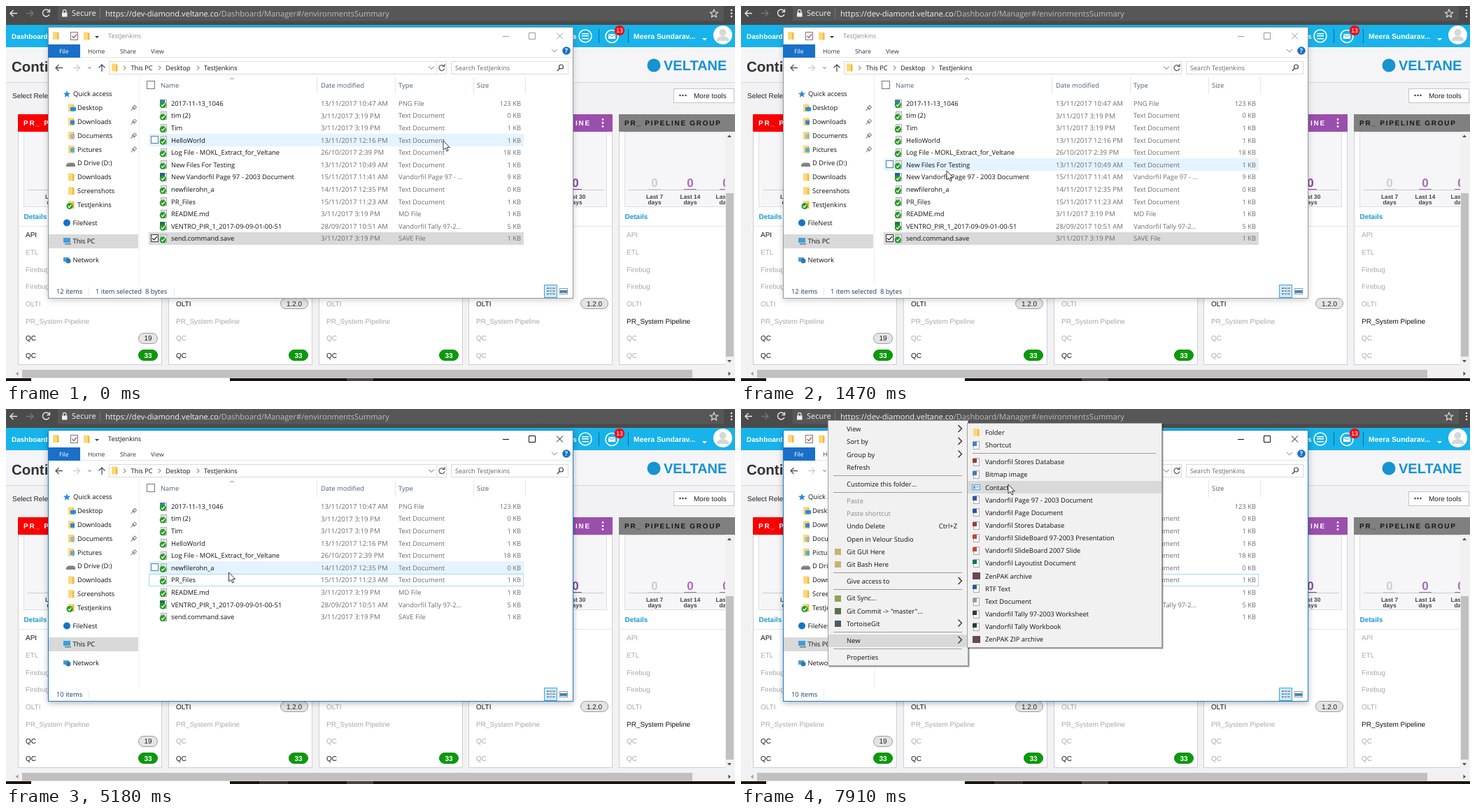
These frames come from a looping animation (1042x537 px, 8000 ms). An HTML page:

```html
<!DOCTYPE html>
<html lang="en">
<head>
<meta charset="utf-8">
<title>File manager demo</title>
<style>
html, body { margin: 0; width: 100%; height: 100%; overflow: hidden; background: #f2f2f4; }
svg { display: block; width: 1042px; height: 537px; }
text { text-rendering: geometricPrecision; white-space: pre; }
.ui { font-family: "Open Sans", "Noto Sans", sans-serif; }
.web { font-family: "Liberation Sans", Arial, sans-serif; }
</style>
</head>
<body>
<svg viewBox="0 0 1042 537" xmlns="http://www.w3.org/2000/svg">
  <defs><filter id="soft" x="-10%" y="-10%" width="120%" height="120%"><feGaussianBlur stdDeviation="4"/></filter></defs>
  <g id="page"></g>
  <g id="frame"></g>
  <g id="list"></g>
  <g id="menu"></g>
  <g id="sub"></g>
  <path id="cursor" d="M0 0V13L3 10.3 5.1 15 7.1 14.1 5.1 9.6H9.3Z" fill="#fff" stroke="#222" stroke-width=".9"/>
</svg>
<script>
const STEP = 70, LOOP = 8000, LAST = 7910;
const el = id => document.getElementById(id);

// y is the middle of the capitals
const text = (x, y, s, o = {}) => {
  const size = o.size || 9.4;
  return `<text class="${o.web ? 'web' : 'ui'}" x="${x}" y="${(y + size * .36).toFixed(2)}" font-size="${size}"` +
    ` fill="${o.fill || '#111'}" text-anchor="${o.anchor || 'start'}" font-weight="${o.bold ? 700 : 400}"` +
    ` letter-spacing="${o.gap || 0}">${s}</text>`;
};
const web = (x, y, s, o = {}) => text(x, y, s, { size: 10, web: true, ...o });
const rect = (x, y, w, h, fill, extra = '') =>
  `<rect x="${x}" y="${y}" width="${w}" height="${h}" fill="${fill}" ${extra}/>`;
const box = (x, y, w, h, fill, stroke, extra = '') =>
  rect(x + .5, y + .5, w - 1, h - 1, fill, `stroke="${stroke}" ${extra}`);
const path = (d, stroke, width = 1, fill = 'none') =>
  `<path d="${d}" fill="${fill}" stroke="${stroke}" stroke-width="${width}"/>`;
const disc = (x, y, r, fill, extra = '') => `<circle cx="${x}" cy="${y}" r="${r}" fill="${fill}" ${extra}/>`;
const tri = (x, y, w, h, fill) => path(`M${x - w} ${y}h${2 * w}l${-w} ${h}Z`, 'none', 0, fill);

const folder = (x, y) => rect(x - 4, y - 5.5, 8, 11, '#fbd877') + rect(x + 2, y - 4, 2.5, 9.5, '#eeb944');
const chevron = (x, y, c = '#444') => path(`M${x - 1.5} ${y - 3}l3 3-3 3`, c);
const down = (x, y, c = '#666') => path(`M${x - 4} ${y - 2}l4 4 4-4`, c);
const greenTick = (x, y) => disc(x, y, 4.6, '#259b24') + path(`M${x - 2.3} ${y}l1.8 1.9 3-4`, '#fff', 1.3);

function drawPage() {
  let s = rect(0, 0, 1042, 537, '#f2f2f4') + rect(0, 0, 1042, 27, '#4b4b4b') + rect(74, 0, 952, 21.5, '#575757');
  // browser bar
  s += path('M16 10.5H6M10.5 6L6 10.5 10.5 15', '#e8e8e8', 1.4) + path('M29 10.5h10M34.5 6L39 10.5 34.5 15', '#777', 1.4);
  s += path('M61.5 7A5 5 0 1 0 62 12M62.5 4.5v4h-4', '#e8e8e8', 1.4);
  s += rect(80, 9.5, 7.5, 6, '#eee') + path('M81.5 10V7.5a2.2 2.2 0 0 1 4.4 0V10', '#eee', 1.2);
  s += text(94, 10.5, 'Secure', { size: 11, fill: '#f4f4f4' }) + rect(134, 3, 1, 15, '#777');
  s += text(142, 10.5, 'https://dev-diamond.veltane.co<tspan fill="#bcbcbc">/Dashboard/Manager#/environmentsSummary</tspan>',
    { size: 11.1, fill: '#f4f4f4' });
  s += path('M1012 5l1.6 3.7 4 .4-3 2.7.9 4-3.5-2.1-3.5 2.1.9-4-3-2.7 4-.4Z', '#e0e0e0', 1.1);
  for (const y of [6, 10.5, 15]) s += disc(1037, y, 1.3, '#e8e8e8');
  // site header
  s += rect(0, 27, 1042, 32, '#17b3ea') + web(8, 43, 'Dashboard', { size: 9.9, bold: true, fill: '#fff' });
  s += web(810, 43, 's', { bold: true, fill: '#fff' });
  s += disc(828, 43, 9, 'none', 'stroke="#fff" stroke-width="1.6"');
  for (const y of [39, 42, 46]) s += rect(823, y, 10, 1.5, '#fff');
  s += rect(847, 33, 1, 20, '#0b6f95') + rect(889, 33, 1, 20, '#0b6f95');
  s += disc(866, 43.5, 9, 'none', 'stroke="#fff" stroke-width="1.6"') + rect(861, 40, 10, 7, '#fff') + path('M861 40.5l5 3.5 5-3.5', '#17b3ea');
  s += disc(877, 35, 7.3, '#e8121c') + web(877, 35, '13', { size: 8.6, fill: '#fff', anchor: 'middle' });
  s += web(897, 43, 'Meera Sundarav...', { size: 10.4, bold: true, fill: '#fff' }) + tri(998.5, 46, 3.5, 3.5, '#fff');
  s += disc(1024.5, 41.5, 13.5, '#fff') + disc(1024.5, 38, 5, '#d5d8da') + path('M1015.5 50a9 7 0 0 1 18 0Z', 'none', 0, '#d5d8da');
  // title rows
  s += rect(0, 59, 1042, 50, '#f5f5f7') + rect(0, 109, 1042, 1, '#d6d6d6') + web(8, 86.5, 'Conti', { size: 20.5, bold: true, fill: '#333' });
  s += disc(926, 85, 9.5, '#1693d1') + web(940, 85, 'VELTANE', { size: 20, bold: true, fill: '#1693d1' });
  s += web(9, 128, 'Select Rele', { fill: '#222' });
  s += box(954, 118, 87, 21, '#fff', '#c4c4c4') + web(983, 128, 'More tools', { fill: '#222' });
  for (const x of [963.5, 967.5, 971.5]) s += disc(x, 128, 1.2, '#333');
  // cards; "on" lists the rows in black
  const rows = ['API', 'ETL', 'Firebug', 'Firebug', 'OLTI', 'PR_System Pipeline', 'QC', 'QC'];
  const cards = [
    { head: '#fa0000', ink: '#fff', title: 'PR_ PIPELINE', on: [0, 6, 7], pills: { 6: '19', 7: '33' } },
    { head: '#9b4fad', ink: '#fff', title: '', on: [4, 7], pills: { 4: '1.2.0', 7: '33' } },
    { head: '#9b4fad', ink: '#fff', title: '', on: [7], pills: { 7: '33' } },
    { head: '#9b4fad', ink: '#fff', title: '', on: [4], pills: { 4: '1.2.0' } },
    { head: '#808080', ink: '#161616', title: 'PR_ PIPELINE GROUP', on: [5], pills: {} }
  ];
  cards.forEach((c, i) => {
    const x = Math.round(17 + 214.75 * i);
    s += box(x, 155, 206, 359, '#fff', '#cfcfcf') + rect(x, 155, 206, 25, c.head);
    s += web(x + 8, 167.5, c.title, { bold: true, fill: c.ink, gap: 1.75 });
    s += box(x + 8, 180, 190, 108, '#f6f6f9', '#dedee2');
    if (i === 3) {
      s += web(836, 167.5, 'INE', { anchor: 'end', bold: true, fill: '#fff', gap: 1.75 });
      for (const y of [162.5, 167.5, 172.5]) s += disc(853, y, 1.4, '#fff');
    }
    ['7', '14', '30'].forEach((n, k) => {
      const cx = x + 51 + 51 * k;
      const ink = i === 3 ? '#8c45a0' : k ? '#a66bb9' : '#d0cbd6';
      s += web(cx, 253, '0', { size: 17, bold: true, fill: ink, anchor: 'middle' }) + rect(cx - 9, 262, 18, 2, ink);
      s += web(cx, 273, 'Last ' + n, { size: 8.4, bold: true, fill: '#444', anchor: 'middle' });
      s += web(cx, 281, 'days', { size: 8.4, bold: true, fill: '#444', anchor: 'middle' });
    });
    s += rect(x + 14, 263, 180, 1, '#ccc');
    s += web(x + 8.5, 301.5, 'Details', { bold: true, fill: '#1b9ad0' }) + rect(x + 1, 315, 204, 1, '#e6e6e6');
    rows.forEach((name, r) => {
      const y = 327.5 + 24.7 * r;
      s += web(x + 11, y, name, { fill: c.on.includes(r) ? '#111' : '#a9a9a9' });
      const label = c.pills[r];
      if (!label) return;
      const w = label.length > 2 ? 40 : 28, green = label === '33', px = x + 200 - w;
      s += box(px, Math.round(y - 8), w, 16, green ? '#0b9a0b' : '#e4e4e4', green ? '#0b8a0b' : '#9d9d9d', 'rx="7.5"');
      s += web(px + w / 2, y, label, { anchor: 'middle', bold: green, fill: green ? '#fff' : '#222' });
    });
  });
  s += rect(1028, 180, 14, 334, '#f1f1f1') + rect(1029, 268, 11, 234, '#c0c0c0');
  s += tri(1034, 188, 3, -3.5, '#505050') + tri(1034, 507, 3, 3.5, '#505050');
  // bottom scroll bar and desktop strip
  s += rect(9, 520, 1033, 13, '#f1f1f1') + rect(23, 521, 958, 11.5, '#c0c0c0');
  s += path('M17.5 523.5v6l-3.5-3Z', 'none', 0, '#999') + path('M1032.5 523.5v6l3.5-3Z', 'none', 0, '#505050');
  s += rect(0, 533, 1042, 4, '#1c140d') + rect(36, 533, 284, 4, '#fff') + rect(487, 533, 38, 4, '#4b4340');
  el('page').innerHTML = s;
}

function navPane() {
  let s = '';
  const places = ['Desktop', 'Downloads', 'Documents', 'Pictures', 'D Drive (D:)', 'Downloads', 'Screenshots', 'TestJenkins'];
  s += rect(61, 327, 128, 20, '#d9d9d9') + rect(190, 100, 1, 300, '#efefef');
  s += path('M87 121l1.4 3.4 3.8.3-2.9 2.4 1 3.7-3.3-2-3.3 2 1-3.7-2.9-2.4 3.8-.3Z', 'none', 0, '#2a8dd8') + text(96, 126, 'Quick access');
  places.forEach((name, i) => {
    const y = 145.9 + 19.8 * i;
    if (i === 4) s += path(`M86 ${y + 2}l3-2.5h8l2 2.5v3H86Z`, 'none', 0, '#7d8387');
    else s += folder(93, y);
    if (i < 4) {
      s += i ? rect(92, y - 2, 6, 6, ['#2f86d2', '#9fb6c8', '#57a9dd'][i - 1]) : rect(92, y - 1, 8, 5.5, '#1f8fe0');
      s += path(`M178.5 ${y + 4}l3-3M180 ${y - 1}l4 4M181.5 ${y - 1}l2.5-2.5 2.5 2.5-2.5 2.5Z`, '#8b8b8b', 1.1);
    }
    if (i === 7) s += greenTick(91, y + 2);
    s += text(102, y, name);
  });
  s += disc(87, 310.5, 5, '#1473c8') + text(95.5, 310.5, 'FileNest');
  s += rect(82, 332, 10, 7, '#3d9fdc') + rect(84, 340, 9, 1.5, '#6b7a86') + text(95.5, 337, 'This PC');
  s += rect(82, 360, 8, 6, '#4e9fd0') + disc(89, 365, 3.5, '#2f77b5') + text(95.5, 363.5, 'Network');
  return s;
}

function drawFrame(active) {
  const ink = active ? '#111' : '#999', edge = active ? '#1a7fd0' : '#8e9aa3';
  let s = `<g filter="url(#soft)">${rect(60, 33, 751, 388, '#000', `opacity="${active ? .3 : .2}"`)}</g>`;
  s += box(60, 30, 751, 389, '#fff', edge);
  s += folder(71, 42.5) + box(92, 37, 11, 12, '#fff', '#777') + path('M94.5 43l2.5 2.5 4-5', '#c05050', 1.3) + folder(115, 43);
  s += tri(130, 43, 3, 3, '#333') + text(146, 43, 'TestJenkins', { size: 9.1, fill: active ? '#111' : '#8d8d8d' });
  s += path('M710 43.5h9M747.5 38.5h9v9h-9ZM787 38.5l9 9M796 38.5l-9 9', ink);
  s += rect(60, 55, 46, 19, '#1a70c8') + text(76, 64.5, 'File', { size: 8.6, fill: '#fff' });
  [[117, 'Home'], [163, 'Share'], [207, 'View']].forEach(([x, n]) => s += text(x, 64.5, n, { size: 8.6, fill: '#333' }));
  s += down(784, 64, '#888') + disc(801, 64, 5.8, '#1a70c8') + text(801, 64, '?', { size: 9, bold: true, fill: '#fff', anchor: 'middle' });
  s += rect(106, 73, 704, 1, '#e4e4e4');
  // address row
  s += path('M81 88.5H71M75.5 84L71 88.5 75.5 93', '#555', 1.3) + path('M96 88.5h9M101 84l4.5 4.5-4.5 4.5', '#cfcfcf', 1.3);
  s += path('M117.5 87.5l2 2 2-2', '#555') + path('M137 94V84M132.5 88.5L137 84l4.5 4.5', '#555', 1.3);
  s += box(147, 79, 483, 19, '#fff', '#dadada') + box(636, 79, 168, 19, '#fff', '#dadada') + folder(155, 88);
  for (const x of [169.5, 219.5, 274.5]) s += chevron(x, 88.5);
  s += text(178.5, 88.5, 'This PC', { size: 9.2 }) + text(228, 88.5, 'Desktop', { size: 9.2 }) + text(283, 88.5, 'TestJenkins', { size: 9.2 });
  s += down(608, 88.5) + rect(615, 80, 1, 17, '#e4e4e4') + path('M626 86a4 4 0 1 0 .8 3.5M627 83v3.5h-3.5', '#555', 1.2);
  s += text(642, 88.5, 'Search TestJenkins', { size: 9.1, fill: '#666' });
  s += disc(793.5, 87, 3, 'none', 'stroke="#444" stroke-width="1.2"') + path('M791.3 89.5l-3.5 3.5', '#444', 1.4);
  // column heads
  s += box(201, 107, 12, 12, '#fff', '#777') + path('M320 105.5l3-2.5 3 2.5', '#888');
  [[221, 'Name'], [450, 'Date modified'], [561, 'Type'], [673, 'Size']].forEach(([x, n]) => s += text(x, 114, n, { fill: '#4c607a' }));
  for (const x of [444, 556, 668, 742]) s += rect(x, 102, 1, 24, '#e5e5e5');
  s += navPane();
  // view switches
  s += box(769, 399, 19, 19, '#cce8ff', '#4ba3dc');
  for (const y of [403.5, 407.5, 411.5]) s += rect(773, y, 3, 1.5, '#4a7ca5') + rect(777, y, 3, 1.5, '#888') + rect(781, y, 4, 1.5, '#888');
  s += box(791, 404, 12, 9, '#fff', '#999') + rect(792, 407, 10, 4, '#3d86bf');
  el('frame').innerHTML = s;
}

const TXT = 'Text Document', OLD = '3/11/2017 3:19 PM';
const files = [
  ['2017-11-13_1046', '13/11/2017 10:47 AM', 'PNG File', 123, '#3d7fb8'],
  ['tim (2)', OLD, TXT, 0], ['Tim', OLD, TXT, 1],
  ['HelloWorld', '13/11/2017 12:16 PM', TXT, 1],
  ['Log File - MOKL_Extract_for_Veltane', '26/10/2017 2:39 PM', TXT, 18],
  ['New Files For Testing', '13/11/2017 10:49 AM', TXT, 1],
  ['New Vandorfil Page 97 - 2003 Document', '15/11/2017 11:41 AM', 'Vandorfil Page 97 - ...', 9, '#2b579a'],
  ['newfilerohn_a', '14/11/2017 12:35 PM', TXT, 0],
  ['PR_Files', '15/11/2017 11:23 AM', TXT, 1],
  ['README.md', OLD, 'MD File', 1],
  ['VENTRO_PIR_1_2017-09-09-01-00-51', '28/09/2017 10:51 AM', 'Vandorfil Tally 97-2...', 5, '#217346'],
  ['send.command.save', OLD, 'SAVE File', 1]
];
const rest = files.filter((f, i) => i !== 5 && i !== 6);

function drawList(t, y) {
  const gone = t >= 4340, items = gone ? rest : files;
  const picked = gone ? [] : t >= 2940 ? [5, 6] : t >= 2030 ? [5] : [11];
  const hover = t < 5880 ? Math.floor((y - 131) / 17.55) : -1;
  const blue = t >= 2030;
  let s = '';
  items.forEach(([name, date, type, size, tint], i) => {
    const c = 139.5 + 17.58 * i, top = Math.round(c - 9), sel = picked.includes(i), hot = hover === i;
    if (sel && blue) s += box(204, top, 536, 18, '#cce8ff', hot || i === 6 ? '#99d1ff' : '#cce8ff');
    else if (sel) s += rect(204, top, 536, 18, '#d9d9d9');
    else if (hot) s += rect(204, top, 536, 18, '#e5f3ff');
    if (gone && i === 6) s += box(204, top, 536, 18, 'none', '#a6d8f5');
    if (sel || hot) s += box(207, top + 3, 11, 11, '#fff', sel ? '#333' : '#4f7ea8');
    if (sel) s += path(`M209 ${top + 8.5}l2.5 2.5 4.5-5`, '#222', 1.2);
    s += box(221, top + 3, 9, 12, '#fff', '#a5a5a5') + rect(223, top + 5, 5, 1, '#bbb');
    if (tint) s += rect(220, top + 3, 7, 6, tint);
    s += greenTick(224.3, c + 2);
    s += text(236, c, name) + text(450, c, date, { size: 9.7, fill: '#6d6d6d' });
    s += text(561, c, type, { fill: '#6d6d6d' }) + text(736, c, size + ' KB', { fill: '#6d6d6d', anchor: 'end' });
  });
  s += text(72, 409, items.length + ' items', { fill: '#1e3a5f' }) + rect(118, 403, 1, 12, '#e8e8e8');
  if (!gone) {
    const two = t >= 2940;
    s += text(128, 409, two ? '2 items selected' : '1 item selected', { fill: '#1e3a5f' });
    s += text(two ? 203.5 : 199, 409, two ? '9.66 KB' : blue ? '676 bytes' : '8 bytes', { fill: '#1e3a5f' });
    s += rect(two ? 246 : 240, 403, 1, 12, '#e8e8e8');
  }
  if (t >= 3710 && !gone) {
    s += `<g opacity="${Math.min(1, (t - 3640) / 280)}">` + box(317, 247, 172, 44, '#fff', '#8a8a8a');
    ['Type: Text Document', 'Size: 676 bytes', 'Date modified: 13/11/2017 10:49 AM']
      .forEach((line, i) => s += text(321, 256 + 12.6 * i, line, { fill: '#575757' }));
    s += '</g>';
  }
  if (t >= 2310) s += rect(362, 533, 41, 4, '#3b332c');
  el('list').innerHTML = s;
}

// label, y, flags: > opens more, - greyed
const mainMenu = [
  ['View', 29, '>'], ['Sort by', 47, '>'], ['Group by', 65.5, '>'], ['Refresh', 83.5], ['Customize this folder...', 107.5],
  ['Paste', 132, '-'], ['Paste shortcut', 150, '-'], ['Undo Delete', 168], ['Open in Velour Studio', 186.5],
  ['Git GUI Here', 204.5, '', '#c3b56a'], ['Git Bash Here', 222.5, '', '#c3b56a'], ['Give access to', 247, '>'],
  ['Git Sync...', 271, '', '#8ba35a'], ['Git Commit -> "master"...', 289.5, '', '#56704f'], ['TortoiseGit', 307.5, '>', '#4d5a66'],
  ['New', 331.5, '>'], ['Properties', 356]
];
const subMenu = [
  ['Folder', '#fbd877'], ['Shortcut', '#3f86c8'], ['Vandorfil Stores Database', '#a4373a'], ['Bitmap image', '#3d7fb8'],
  ['Contact', '#58a5cf'], ['Vandorfil Page 97 - 2003 Document', '#2b579a'], ['Vandorfil Page Document', '#2b579a'],
  ['Vandorfil Stores Database', '#a4373a'], ['Vandorfil SlideBoard 97-2003 Presentation', '#c5472a'],
  ['Vandorfil SlideBoard 2007 Slide', '#c5472a'], ['Vandorfil Layoutist Document', '#077568'], ['ZenPAK archive', '#6b4655'],
  ['RTF Text', '#2b579a'], ['Text Document', '#999'], ['Vandorfil Tally 97-2003 Worksheet', '#2f3b33'],
  ['Vandorfil Tally Workbook', '#2f3b33'], ['ZenPAK ZIP archive', '#6b4655']
].map(([name, tint], i) => [name, i < 2 ? 33.5 + 18 * i : 75.8 + 18.16 * (i - 2), tint]);

const panel = (x, y, w, h) => rect(x + 1.5, y + 1.5, w, h, '#000', 'opacity=".4"') + box(x, y, w, h, '#f1f1f1', '#a0a0a0');
const bar = (x, c, w) => rect(x, Math.round(c - 9), w, 18, '#d9d9d9');
const near = y => item => Math.abs(y - item[1]) < 9.1;

function drawMenu(t, x, y) {
  el('menu').setAttribute('opacity', t < 5950 ? .6 : 1);
  if (t < 5880) return el('menu').innerHTML = '';
  const hot = t >= 6860 ? mainMenu[15] : x < 324 && mainMenu.find(near(y));
  let s = panel(124, 16, 201, 352);
  for (const line of [95, 119, 234, 258, 319, 343]) s += rect(132, line, 184, 1, '#9c9c9c');
  for (const item of mainMenu) {
    const [name, c, flag, tint] = item;
    if (item === hot) s += bar(125, c, 199);
    if (tint) s += rect(134, Math.round(c - 4.5), 9, 9, tint);
    s += text(151, c, name, { fill: flag === '-' ? '#8a8a8a' : '#111' });
    if (flag === '>') s += path(`M310.5 ${c - 6}l5 5-5 5`, '#222', 1.2);
  }
  el('menu').innerHTML = s + text(309, 168, 'Ctrl+Z', { anchor: 'end' });
}

function drawSub(t, x, y) {
  el('sub').setAttribute('opacity', t < 7280 ? .6 : 1);
  if (t < 7210) return el('sub').innerHTML = '';
  const hot = x > 324 && subMenu.find(near(y));
  let s = panel(323, 20, 279, 322) + rect(331, 63, 262, 1, '#9c9c9c');
  for (const item of subMenu) {
    const [name, c, tint] = item, mid = Math.round(c);
    if (item === hot) s += bar(324, c, 277);
    if (name === 'Folder') s += folder(336, c);
    else if (name === 'Contact') s += box(330, mid - 4, 12, 8, '#d9eef8', tint) + rect(332, mid - 2, 3, 4, tint) + rect(336, mid - 1, 4, 1, tint);
    else if (name.startsWith('Zen')) s += rect(331, mid - 5, 11, 10, tint);
    else s += box(332, mid - 6, 9, 12, '#fff', '#a8a8a8') + rect(331, mid - 5, 6, 6, tint);
    s += text(349, c, name);
  }
  el('sub').innerHTML = s;
}

// time, x, y of the pointer
const track = [
  [0, 625, 193], [490, 351, 316], [630, 330, 344], [840, 305, 301], [1260, 296, 246], [1330, 296, 246],
  [1470, 294, 236], [1610, 294, 230], [1680, 294, 230], [1750, 294, 228], [1960, 294, 228], [2030, 294, 227],
  [2380, 294, 227], [2730, 297, 227], [2870, 297, 227], [2940, 309, 235], [3150, 309, 235], [3360, 317.5, 234],
  [5110, 317.5, 234], [5180, 318.5, 234], [5530, 325, 369], [6160, 325, 369], [6500, 270, 312], [6860, 235, 340],
  [7210, 235, 340], [7350, 322, 333], [7910, 382, 108]
];
function pointer(t) {
  const i = Math.max(1, track.findIndex(k => k[0] >= t));
  const [t0, x0, y0] = track[i - 1], [t1, x1, y1] = track[i], f = (t - t0) / (t1 - t0);
  return [x0 + (x1 - x0) * f, y0 + (y1 - y0) * f];
}

let shown = -1, wasActive = null;
function draw(ms) {
  const t = Math.min(LAST, Math.floor(ms / STEP) * STEP);
  if (t === shown) return;
  shown = t;
  const [x, y] = pointer(t), active = t >= 2170;
  if (active !== wasActive) drawFrame(wasActive = active);
  drawList(t, y);
  drawMenu(t, x, y);
  drawSub(t, x, y);
  el('cursor').setAttribute('transform', `translate(${x} ${y})`);
}

drawPage();
const start = performance.now();
function tick() {
  draw((performance.now() - start) % LOOP);
  requestAnimationFrame(tick);
}
tick();
</script>
</body>
</html>
```
